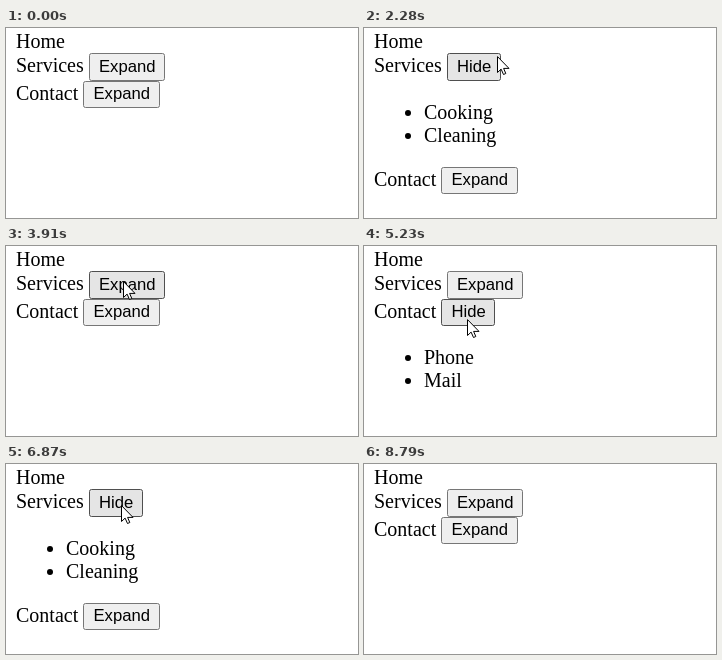
Recreate the animation shown at these times as an HTML page. Size 352 px wide and 190 px high, loop 9650 ms.

```html
<!DOCTYPE html>
<html lang="en">
<head>
<meta charset="utf-8">
<title>Expandable menu</title>
<style>
  html, body { margin: 0; width: 100%; height: 100%; overflow: hidden; background: #fff; }
  svg { display: block; width: 352px; height: 190px; }
  text { font: 20px "Liberation Serif", "Times New Roman", serif; fill: #000; }
  .btn text { font: 16.67px "Liberation Sans", Arial, sans-serif; }
  .btn rect { fill: #efefef; stroke: #767676; stroke-width: 1px; width: 75px; }

  /* One loop is 9650 ms, so 1% is 96.5 ms. */
  .services rect { animation: services-look 9650ms step-end infinite, services-width 9650ms step-end infinite; }
  .contact rect { animation: contact-look 9650ms step-end infinite, contact-width 9650ms step-end infinite; }
  .services-open { animation: services-open 9650ms step-end infinite; }
  .services-shut { animation: services-shut 9650ms step-end infinite; }
  .contact-open { animation: contact-open 9650ms step-end infinite; }
  .contact-shut { animation: contact-shut 9650ms step-end infinite; }
  .contact { animation: push 9650ms step-end infinite; }
  .cursor { animation: cursor 9650ms step-end infinite; }

  @keyframes services-open {
    0%, 40.51%, 85.59%, 100% { opacity: 0; }
    22.87%, 71.19% { opacity: 1; }
  }
  @keyframes services-shut {
    0%, 40.51%, 85.59%, 100% { opacity: 1; }
    22.87%, 71.19% { opacity: 0; }
  }
  @keyframes services-width {
    0%, 40.51%, 85.59%, 100% { width: 75px; }
    22.87%, 71.19% { width: 53px; }
  }
  @keyframes push {
    0%, 40.51%, 85.59%, 100% { transform: translateY(0); }
    22.87%, 71.19% { transform: translateY(86px); }
  }
  @keyframes contact-open {
    0%, 71.19%, 100% { opacity: 0; }
    54.19% { opacity: 1; }
  }
  @keyframes contact-shut {
    0%, 71.19%, 100% { opacity: 1; }
    54.19% { opacity: 0; }
  }
  @keyframes contact-width {
    0%, 71.19%, 100% { width: 76px; }
    54.19% { width: 53px; }
  }

  /* Plain, hovered and pressed colours */
  @keyframes services-look {
    0%, 51.01%, 88.7%, 100% { fill: #efefef; stroke: #767676; }
    10.77%, 22.87%, 40.51%, 65.46%, 71.19%, 85.59% { fill: #e5e5e5; stroke: #4f4f4f; }
    22.07%, 39.68%, 70.36%, 84.79% { fill: #f5f5f5; stroke: #8d8d8d; }
  }
  @keyframes contact-look {
    0%, 65.46%, 100% { fill: #efefef; stroke: #767676; }
    51.01%, 54.19% { fill: #e5e5e5; stroke: #4f4f4f; }
    53.39% { fill: #f5f5f5; stroke: #8d8d8d; }
  }

  /* The pointer advances about every 77 ms. */
  @keyframes cursor {
    0% { transform: translate(360px, 200px); }
    4.35% { transform: translate(258px, 158px); animation-timing-function: steps(5); }
    8.36% { transform: translate(190px, 85px); animation-timing-function: steps(4); }
    11.57% { transform: translate(145px, 38px); animation-timing-function: steps(3); }
    13.98% { transform: translate(133px, 28px); }
    31.74% { transform: translate(133px, 28px); animation-timing-function: steps(5); }
    35.75% { transform: translate(117px, 35px); }
    48.63% { transform: translate(117px, 35px); animation-timing-function: steps(5); }
    52.61% { transform: translate(103px, 73px); }
    61.48% { transform: translate(103px, 73px); animation-timing-function: steps(7); }
    67.04% { transform: translate(115px, 41px); }
    77.64% { transform: translate(115px, 41px); animation-timing-function: steps(6); }
    82.38% { transform: translate(114px, 49px); animation-timing-function: steps(2); }
    84% { transform: translate(115px, 46px); }
    87.9% { transform: translate(115px, 46px); animation-timing-function: steps(4); }
    91.08%, 100% { transform: translate(186px, 214px); }
  }
</style>
</head>
<body>
<svg viewBox="0 0 352 190">
  <text x="10" y="20">Home</text>

  <text x="10" y="44">Services</text>
  <g class="btn services">
    <rect x="83.5" y="25.5" height="27" rx="2"/>
    <text class="services-shut" x="93" y="44">Expand</text>
    <text class="services-open" x="93" y="44">Hide</text>
  </g>
  <g class="services-open">
    <circle cx="44" cy="85" r="3"/>
    <text x="60" y="91">Cooking</text>
    <circle cx="44" cy="108" r="3"/>
    <text x="60" y="114">Cleaning</text>
  </g>

  <g class="contact">
    <text x="10" y="72">Contact</text>
    <g class="btn">
      <rect x="77.5" y="53.5" height="26" rx="2"/>
      <text class="contact-shut" x="87.5" y="71">Expand</text>
      <text class="contact-open" x="87.5" y="71">Hide</text>
    </g>
  </g>
  <g class="contact-open">
    <circle cx="44" cy="112" r="3"/>
    <text x="60" y="118">Phone</text>
    <circle cx="44" cy="135" r="3"/>
    <text x="60" y="141">Mail</text>
  </g>

  <path class="cursor" d="M.5 .6V16.5L4.1 13.1 6.5 18.5 8.8 17.5 6.6 12.4H12Z" fill="#fff" stroke="#000" stroke-linejoin="round"/>
</svg>
</body>
</html>
```
